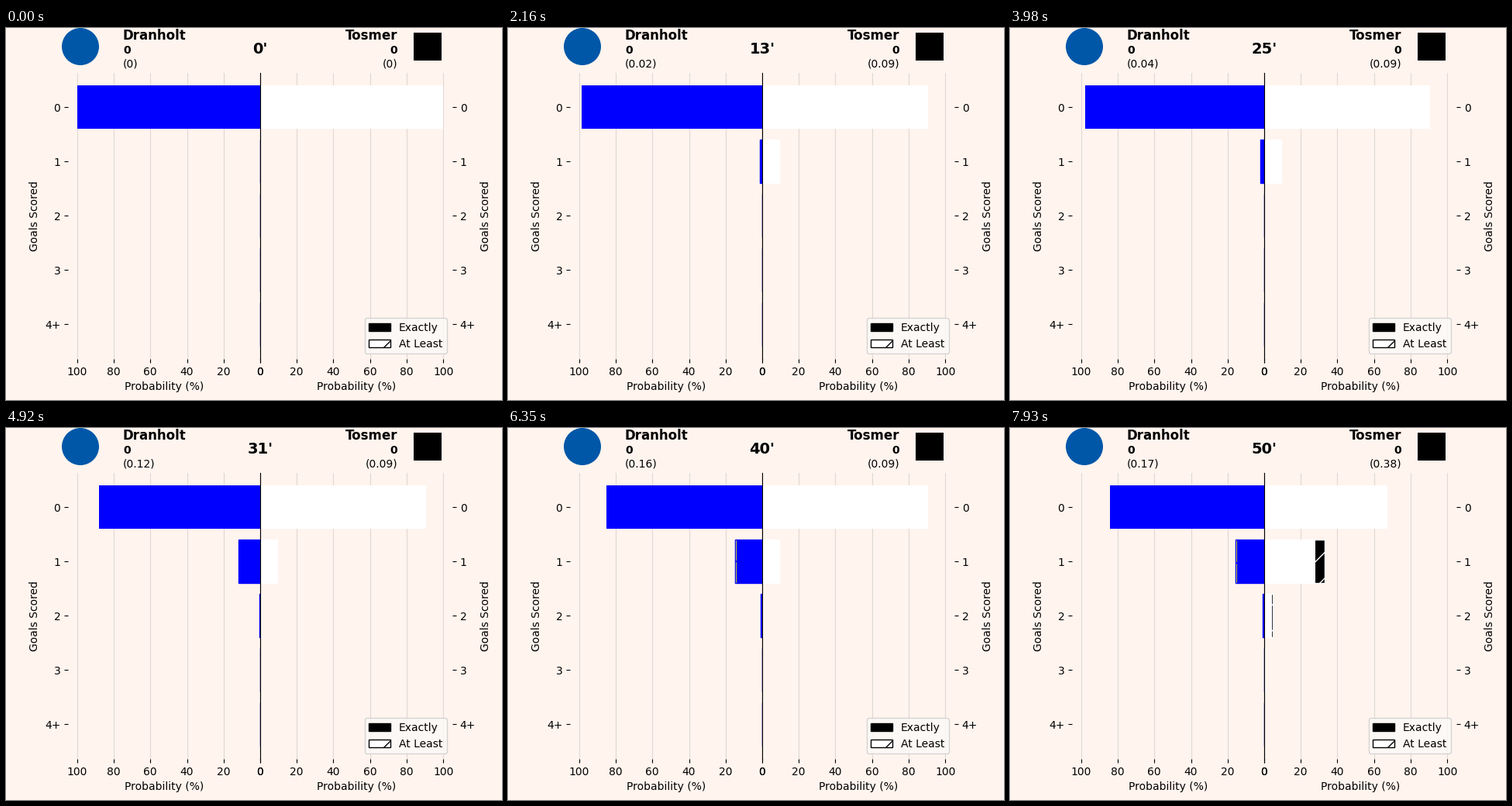
A matplotlib script for the animation above (8 s loop, 640 px wide and 480 px high).

```python
import matplotlib.pyplot as plt
import numpy as np
from matplotlib.animation import FuncAnimation
from matplotlib.patches import Circle, Patch, Rectangle
from matplotlib.transforms import IdentityTransform

W, H, DPI = 640, 480, 100
LOOP, STEP = 8000, 25
BG = "#fff4ee"
ROWS = np.arange(5)

# Minute of play -> chances created in it, as scoring probabilities
HOME_SHOTS = {13: [0.017], 25: [0.023], 26: [0.083], 38: [0.034], 46: [0.01]}
AWAY_SHOTS = {2: [0.094], 42: [0.1], 46: [0.1, 0.085]}
ACTIVE = set(HOME_SHOTS) | set(AWAY_SHOTS)
TICK, SUB, SUBS = 160, 30, 5


def build_timeline():
    """Start time, minute and bar progress of every visible step."""
    steps, t, minute = [], 0, 0
    while t < LOOP:
        if minute in ACTIVE:
            for k in range(SUBS):
                steps.append((t, minute, (k + 1) / SUBS))
                t += SUB
        else:
            steps.append((t, minute, 1.0))
            t += TICK
        minute += 1
    return steps


def chances(shots, minute):
    return [p for m, ps in shots.items() if m <= minute for p in ps]


def goal_odds(shots, minute):
    """Percent odds of exactly and at least 0..4+ goals."""
    dist = np.array([1.0])
    for p in chances(shots, minute):
        dist = np.convolve(dist, [1 - p, p])
    dist = np.append(dist, np.zeros(5))
    exact = np.append(dist[:4], dist[4:].sum())
    least = exact[::-1].cumsum()[::-1]
    return 100 * exact, 100 * least


class Side:
    def __init__(self, ax, shots, main, second, xg_text):
        self.shots, self.xg_text = shots, xg_text
        self.least = ax.barh(ROWS[1:], np.zeros(4), 0.8, color=second,
                             edgecolor=main, hatch="/")
        self.exact = ax.barh(ROWS, np.zeros(5), 0.8, color=main)

    def update(self, minute, progress):
        old = goal_odds(self.shots, minute - 1)
        new = goal_odds(self.shots, minute)
        exact, least = (a + (b - a) * progress for a, b in zip(old, new))
        for bar, w in zip(self.exact, exact):
            bar.set_width(w)
        for bar, w in zip(self.least, least[1:]):
            bar.set_width(w)
        total = round(sum(chances(self.shots, minute)), 2)
        self.xg_text.set_text(f"({total})")


def style(ax, inner, outer):
    ax.set_facecolor(BG)
    ax.set_axisbelow(True)
    ax.grid(axis="x", alpha=0.4)
    for name, spine in ax.spines.items():
        spine.set_visible(name == inner)
    ax.set_xlim((105, 0) if outer == "left" else (0, 105))
    ax.set_ylim(4.64, -0.64)
    ax.set_xticks(range(0, 101, 20))
    ax.set_yticks(ROWS, ["0", "1", "2", "3", "4+"])
    ax.yaxis.set_ticks_position(outer)
    ax.yaxis.set_label_position(outer)
    ax.set_xlabel("Probability (%)")
    ax.set_ylabel("Goals Scored")


def label(x, y, text, size=10, weight="normal", ha="left"):
    return fig.text(x / W, 1 - y / H, text, fontsize=size, weight=weight,
                    ha=ha, va="baseline")


def header(x, name, ha):
    label(x, 15, name, 12, "bold", ha)
    label(x, 33, "0", 10, "bold", ha)
    return label(x, 50, "(0.0)", ha=ha)


plt.rcParams["font.family"] = "DejaVu Sans"
fig = plt.figure(figsize=(W / DPI, H / DPI), dpi=DPI, facecolor=BG)
left = fig.add_axes([0.125, 0.11, 0.3875, 0.77])
right = fig.add_axes([0.5125, 0.11, 0.3875, 0.77])

home = Side(left, HOME_SHOTS, "blue", "yellow", header(151, "Dranholt", "left"))
away = Side(right, AWAY_SHOTS, "white", "black", header(505, "Tosmer", "right"))
style(left, "right", "left")
style(right, "left", "right")
clock = label(328, 33, "0'", 14, "bold", "center")

px = IdentityTransform()
fig.add_artist(Circle((96, H - 24), 24, fc="#0057a8", ec="none", transform=px))
fig.add_artist(Rectangle((526, H - 42), 36, 36, fc="black", ec="none",
                         transform=px))

right.legend(
    handles=[Patch(fc="black", ec="black", label="Exactly"),
             Patch(fc="white", ec="black", hatch="/", label="At Least")],
    loc="lower right", facecolor="#fcfaf7")

TIMELINE = build_timeline()
STARTS = [s[0] for s in TIMELINE]


def draw(n):
    # Look slightly ahead so that steps land on the coarser frame clock
    i = np.searchsorted(STARTS, n * STEP + 20, side="right") - 1
    _, minute, progress = TIMELINE[i]
    home.update(minute, progress)
    away.update(minute, progress)
    clock.set_text(f"{minute}'")
    return []


anim = FuncAnimation(fig, draw, frames=LOOP // STEP, interval=STEP,
                     repeat=True, repeat_delay=0, init_func=lambda: draw(0))
plt.show()
```
